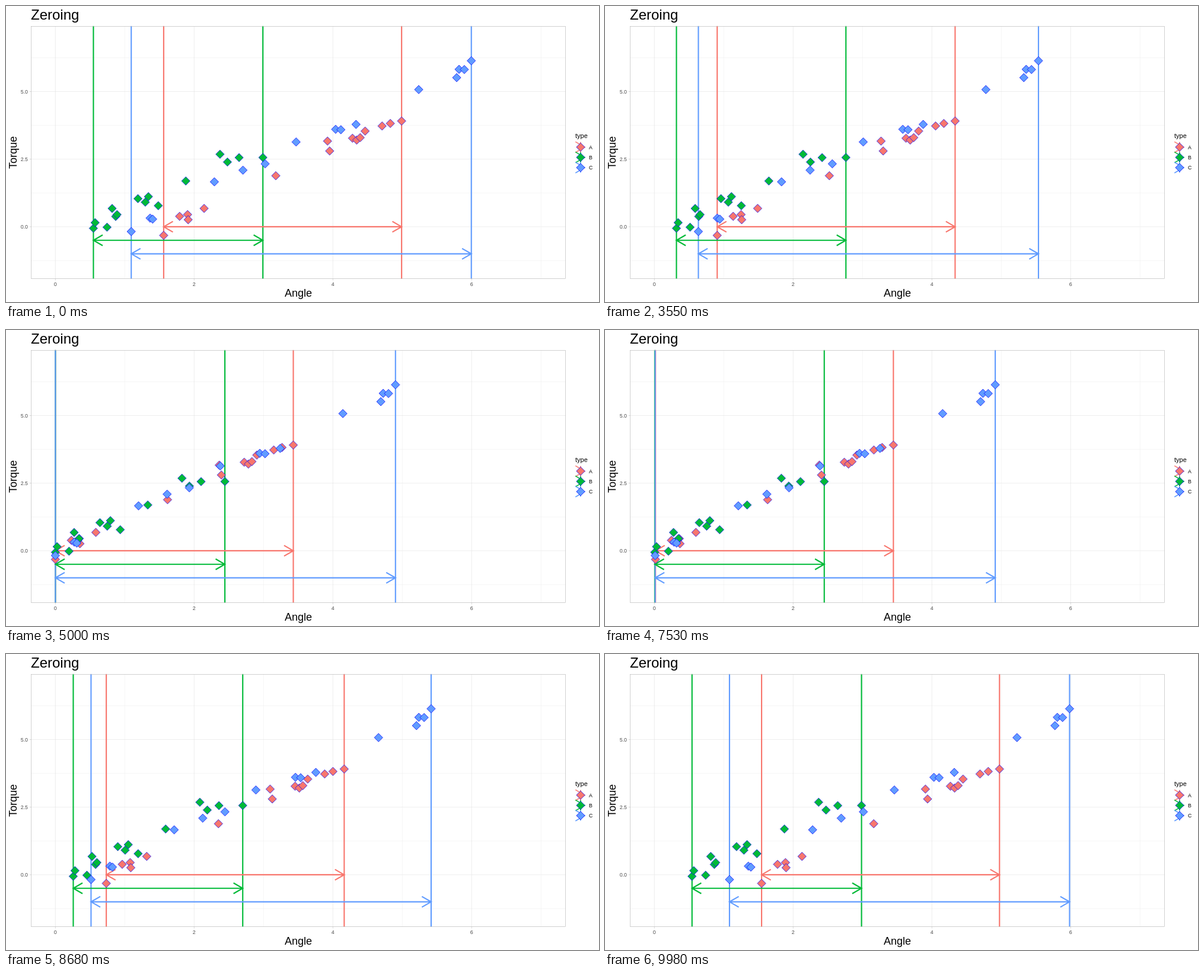
Animation, 1000 px wide and 500 px high, one loop 10 s. Source, as an HTML page:

```html
<!DOCTYPE html>
<html lang="en">
<head>
<meta charset="utf-8">
<title>Zeroing</title>
<style>
  html, body { margin: 0; width: 100%; height: 100%; overflow: hidden; background: #fff; }
  svg { display: block; width: 1000px; height: 500px; }
  text { font-family: "Liberation Sans", Arial, sans-serif; }
  .tick { font-size: 8.8px; fill: #4d4d4d; }
  .key { font-size: 8.8px; }
  .axis { font-size: 18px; text-anchor: middle; }
</style>
</head>
<body>
<svg id="plot" viewBox="0 0 1000 500">
  <defs><clipPath id="panel"><rect x="42.3" y="33.8" width="901.4" height="427"/></clipPath></defs>
  <rect width="1000" height="500" fill="#fff"/>
</svg>
<script>
const svg = document.getElementById('plot');
const LEFT = 42.5, RIGHT = 943.5, TOP = 34.3, BOTTOM = 460.6;
const X0 = 83.3, LINE = 2.13;
const px = v => X0 + v * 117;
const py = v => 372.9 - v * 45.68;

// Points are x, y pairs in stage pixels before zeroing.
const series = [
  { name: 'A', color: '#F8766D', level: 0, pts: [
    265.9,387.5, 292.8,355.3, 306.2,352.3, 307.2,361, 334.1,341.9, 455,286.7,
    542.2,228.2, 545.8,244.9, 584.3,223.3, 591.4,226.5, 597.3,222.3, 605.6,211.3,
    634.2,202.7, 648.1,198.4, 667.1,194.3] },
  { name: 'B', color: '#00BA38', level: -0.5, pts: [
    147.4,375.5, 150.3,366, 170.4,373.7, 179,342, 185,355.5, 187.3,352.3,
    222.5,325.4, 234.9,331.4, 240.2,322, 256.8,337.3, 303.2,295.6, 360.9,250.4,
    373.4,263.6, 393.1,256.1, 433.2,255.9] },
  { name: 'C', color: '#619CFF', level: -1, pts: [
    211.2,381, 243,358.3, 247.3,360, 351.4,297, 399.6,277.3, 437,266.6,
    489.2,229.7, 555.9,208.3, 564.7,209, 590.3,200, 696,141.2, 760,121,
    764,107, 772.9,107.3, 784.7,92.5] }
];

function add(parent, tag, attrs, text) {
  const el = document.createElementNS('http://www.w3.org/2000/svg', tag);
  for (const k in attrs) el.setAttribute(k, attrs[k]);
  if (text) el.textContent = text;
  parent.appendChild(el);
  return el;
}
const stroke = (parent, d, color, width) =>
  add(parent, 'path', { d, fill: 'none', stroke: color, 'stroke-width': width });
const label = (x, y, text, attrs) => add(svg, 'text', { x, y, ...attrs }, text);
const diamond = (parent, x, y, fill) => add(parent, 'path', {
  d: `M${x - 7.13} ${y}l7.13 -7.13l7.13 7.13l-7.13 7.13z`,
  fill, stroke: '#00f', 'stroke-width': 0.75 });
const head = (x, y, dir) => `M${x - 15.6 * dir} ${y - 9}L${x} ${y}L${x - 15.6 * dir} ${y + 9}`;

function grid(xs, ys, width) {
  xs.forEach(v => stroke(svg, `M${px(v)} ${TOP}V${BOTTOM}`, '#dedede', width));
  ys.forEach(v => stroke(svg, `M${LEFT} ${py(v)}H${RIGHT}`, '#dedede', width));
}
grid([1, 3, 5, 7], [-1.25, 1.25, 3.75, 6.25], 0.27);
grid([0, 2, 4, 6], [0, 2.5, 5], 0.53);

// Layers: vertical lines, then arrows, then points.
const data = add(svg, 'g', { 'clip-path': 'url(#panel)' });
const moving = [];
const layer = draw => series.forEach(s => {
  const g = add(data, 'g', {});
  const min = s.pts[0], max = s.pts[s.pts.length - 2];
  draw(g, s, min, max);
  moving.push({ g, shift: X0 - min });
});
layer((g, s, min, max) =>
  stroke(g, `M${min} ${TOP - 1}V${BOTTOM + 1}M${max} ${TOP - 1}V${BOTTOM + 1}`, s.color, LINE));
layer((g, s, min, max) => {
  const y = py(s.level);
  stroke(g, `M${min} ${y}H${max}` + head(min, y, -1) + head(max, y, 1), s.color, LINE);
});
layer((g, s) => {
  for (let i = 0; i < s.pts.length; i += 2) diamond(g, s.pts[i], s.pts[i + 1], s.color);
});

add(svg, 'rect', { x: LEFT, y: 34.5, width: RIGHT - LEFT, height: 426,
  fill: 'none', stroke: '#b3b3b3', 'stroke-width': 0.6 });
[0, 2, 4, 6].forEach(v => {
  stroke(svg, `M${px(v)} ${BOTTOM}v2.8`, '#b3b3b3', 0.53);
  label(px(v), 473, String(v), { class: 'tick', 'text-anchor': 'middle' });
});
[0, 2.5, 5].forEach(v => {
  stroke(svg, `M${LEFT} ${py(v)}h-2.8`, '#b3b3b3', 0.53);
  label(37, py(v) + 3.1, v.toFixed(1), { class: 'tick', 'text-anchor': 'end' });
});

label(42, 23, 'Zeroing', { 'font-size': 24 });
label(493, 491, 'Angle', { class: 'axis' });
label(0, 0, 'Torque', { class: 'axis', transform: 'translate(18 247.5) rotate(-90)' });

label(960, 223, 'type', { 'font-size': 11 });
series.forEach((s, i) => {
  const x = 969, y = 238.4 + i * 17.28;
  stroke(svg, `M${x} ${y - 8.64}v17.28M${x - 6.9} ${y}h13.8` + head(x + 6.9, y, 1), s.color, 1.6);
});
series.forEach((s, i) => {
  const y = 238.4 + i * 17.28;
  diamond(svg, 969, y, s.color);
  label(983, y + 3.2, s.name, { class: 'key' });
});

// Linear travel in 100 steps, lasting 30 and 20 ms in turn.
const step = u => 2 * Math.floor(u / 50) + (u % 50 >= 30 ? 1 : 0);
function zeroed(t) {
  if (t < 2500) return 0;
  if (t < 5000) return step(t - 2500) / 100;
  if (t < 7500) return 1;
  return 1 - step(t - 7500) / 100;
}

const start = performance.now();
function frame(now) {
  const p = zeroed(Math.max(0, now - start) % 10000);
  moving.forEach(m => m.g.setAttribute('transform', `translate(${m.shift * p} 0)`));
  requestAnimationFrame(frame);
}
frame(start);
</script>
</body>
</html>
```
